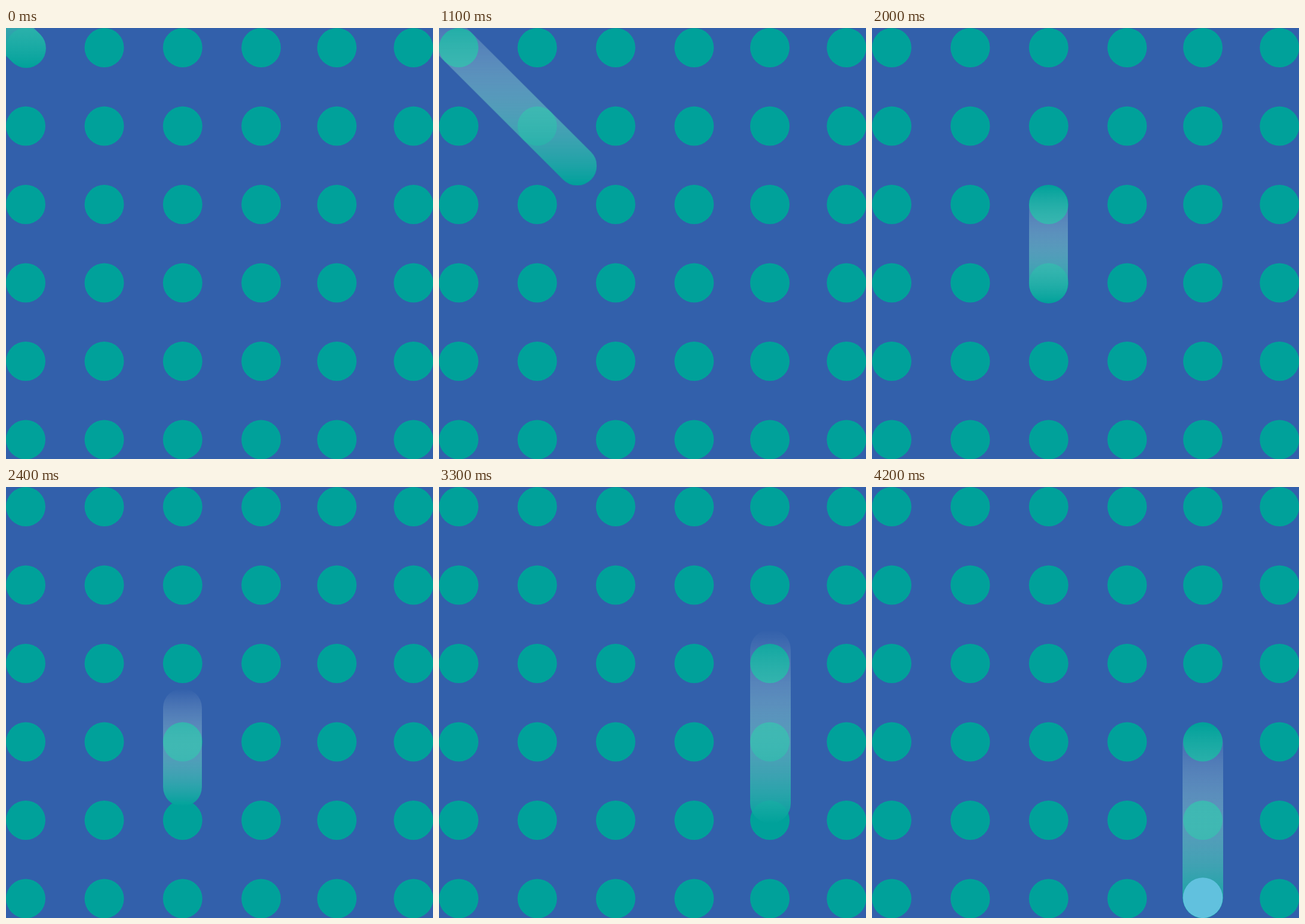
Write an HTML page that moves like this. It is 715x723 px and loops after 4.7 s.

```html
<!DOCTYPE html>
<html lang="en">
<head>
<meta charset="utf-8">
<title>Dot grid</title>
<style>
  html, body { margin: 0; width: 100%; height: 100%; overflow: hidden; background: #3260ab; }
  svg { display: block; width: 715px; height: 723px; }
  #row { fill: #00a19a; }
  .trail { stroke-linecap: round; }
  .trail, .ball { opacity: 0; animation: 4.7s step-end infinite; }

  /* Percentages are multiples of 100 ms in a 4700 ms loop. */
  .slant { animation-name: slant; }
  .drop { animation-name: drop; }
  .fall { animation-name: fall; }
  .red { animation-name: red; }
  .yellow { animation-name: yellow; }
  .sky { animation-name: sky; }

  @keyframes slant {
    0% { opacity: 1; transform: translate(0, 0); animation-timing-function: steps(6); }
    12.7659% { opacity: 1; transform: translate(102px, 102px); }
    14.8936% { opacity: 1; transform: translate(126px, 126px); animation-timing-function: steps(5); }
    25.5319% { opacity: 1; transform: translate(215px, 215px); animation-timing-function: steps(3); }
    31.9148% { opacity: 1; transform: translate(261px, 261px); }
    42.5531%, 100% { opacity: 0; transform: translate(261px, 261px); }
  }
  @keyframes drop {
    0% { opacity: 0; transform: translate(0, 0); }
    42.5531% { opacity: 1; transform: translate(0, 0); animation-timing-function: steps(7); }
    57.4468% { opacity: 1; transform: translate(0, 129px); }
    68.0851%, 100% { opacity: 0; transform: translate(0, 129px); }
  }
  @keyframes fall {
    0% { opacity: 0; transform: translate(0, 0); }
    68.0851% { opacity: 1; transform: translate(0, 0); animation-timing-function: steps(7); }
    82.9787% { opacity: 1; transform: translate(0, 137px); }
    87.234% { opacity: 1; transform: translate(-1px, 157px); }
    89.3617%, 100% { opacity: 1; transform: translate(-1px, 177px); }
  }
  @keyframes red { 0%, 42.5531%, 100% { opacity: 0; } 31.9148% { opacity: 1; } }
  @keyframes yellow { 0%, 68.0851%, 100% { opacity: 0; } 57.4468% { opacity: 1; } }
  @keyframes sky { 0% { opacity: 0; } 89.3617%, 100% { opacity: 1; } }
</style>
</head>
<body>
<svg viewBox="0 0 715 723">
  <defs>
    <linearGradient id="fade" gradientUnits="userSpaceOnUse" x1="0" x2="0" y1="-250" y2="67">
      <stop offset="0" stop-color="#fff" stop-opacity="0"/>
      <stop offset="1" stop-color="#00a19a"/>
    </linearGradient>
    <linearGradient id="fadeDrop" href="#fade" y1="264" y2="462"/>
    <linearGradient id="fadeFall" href="#fade" y1="219" y2="545"/>
    <g id="row">
      <circle cx="33" cy="33" r="33"/>
      <circle cx="164.5" cy="33" r="33"/>
      <circle cx="295.8" cy="33" r="33"/>
      <circle cx="427.2" cy="33" r="33"/>
      <circle cx="554" cy="33" r="33"/>
      <circle cx="682.3" cy="33" r="33"/>
    </g>
  </defs>

  <use href="#row"/>
  <use href="#row" y="131.5"/>
  <use href="#row" y="263"/>
  <use href="#row" y="394.5"/>
  <use href="#row" y="526"/>
  <use href="#row" y="657.5"/>

  <line class="trail slant" x1="-217" y1="-217" x2="34" y2="34" stroke="url(#fade)" stroke-width="66"/>
  <line class="trail drop" x1="295.5" y1="296.5" x2="295.5" y2="429.5" stroke="url(#fadeDrop)" stroke-width="65"/>
  <line class="trail fall" x1="555" y1="253" x2="555" y2="511" stroke="url(#fadeFall)" stroke-width="68"/>

  <ellipse class="ball red" cx="295.5" cy="295.7" rx="33.3" ry="34" fill="#ff5f57"/>
  <ellipse class="ball yellow" cx="295.5" cy="558.7" rx="33.3" ry="34" fill="#f1be41"/>
  <ellipse class="ball sky" cx="554" cy="689.2" rx="33.3" ry="34" fill="#61c1de"/>
</svg>
</body>
</html>
```
